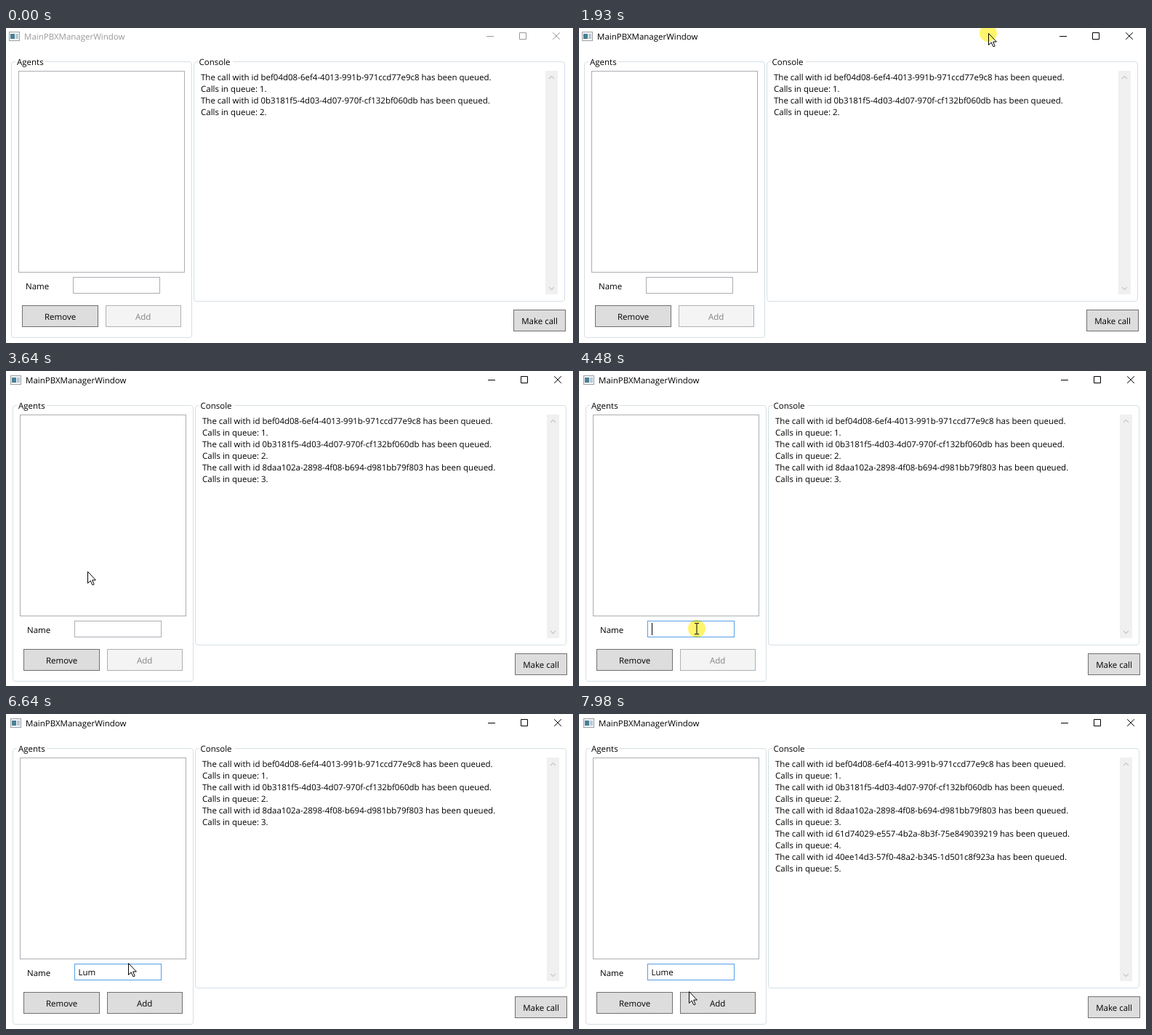
An HTML page for the animation above (8000 ms loop, 780 px wide and 434 px high).

```html
<!DOCTYPE html>
<html lang="en">
<head>
<meta charset="utf-8">
<title>Call manager</title>
<style>
  html, body { margin: 0; width: 100%; height: 100%; overflow: hidden; background: #fff; }
  svg { display: block; width: 780px; height: 434px; }
  text { font: 11.5px "Open Sans", "Noto Sans", sans-serif; text-rendering: geometricPrecision; white-space: pre; }
  .group { fill: none; stroke: #d5dfe5; }
  .field { fill: #fff; stroke: #abadb3; }
  .button { fill: #ddd; stroke: #707070; }
  .mid { text-anchor: middle; }
  .chrome { --ink: #999; }
  .chrome.active { --ink: #000; }
  .chrome text { fill: var(--ink); }
  .chrome path { fill: none; stroke: var(--ink); }
  .add.off rect { fill: #f4f4f4; stroke: #adb2b5; }
  .add.off text { fill: #838383; }
  .add.hover rect { fill: #bee6fd; stroke: #3c7fb1; }
  .arrows { fill: none; stroke: #cacaca; stroke-width: 1.3; }
  .pointer { fill: #fff; stroke: #000; }
  #halo { fill: #fff56c; mix-blend-mode: multiply; }
</style>
</head>
<body>
<svg viewBox="0 0 780 434">
  <rect width="780" height="434" fill="#fff"/>
  <g id="win">
    <rect x="4.5" y="5.5" width="14" height="12" fill="#f4f6f7" stroke="#9aa0a4"/>
    <rect x="6" y="8" width="6" height="7" fill="#4b7f96"/>
    <rect x="13" y="8" width="4" height="7" fill="#b9cad2"/>
    <g id="chrome" class="chrome">
      <text x="25" y="16">MainPBXManagerWindow</text>
      <path d="M661 11.5h10M706.5 6.5h9v9h-9zM752.2 6.2l9.6 9.6M761.8 6.2l-9.6 9.6"/>
    </g>

    <rect class="group" x="7.5" y="46.5" width="248" height="380" rx="3.5"/>
    <rect class="group" x="258.5" y="46.5" width="510" height="330" rx="3.5"/>
    <path d="M13 44h41v5h-41zM264 44h48v5h-48z" fill="#fff"/>
    <text x="15" y="51">Agents</text>
    <text x="265.5" y="51">Console</text>

    <rect class="field" x="17.5" y="59.5" width="228" height="277"/>
    <text x="27" y="360">Name</text>
    <rect id="box" class="field" x="92.5" y="343.5" width="119" height="22"/>
    <text id="entry" x="97.5" y="359"></text>
    <rect id="caret" y="346" width="1" height="17"/>

    <rect class="button" x="22.5" y="382.5" width="104" height="29"/>
    <text class="mid" x="74.5" y="402">Remove</text>
    <g id="add" class="add">
      <rect class="button" x="137.5" y="382.5" width="103" height="29"/>
      <text class="mid" x="188.7" y="402">Add</text>
    </g>
    <rect class="button" x="698.5" y="388.5" width="71" height="29"/>
    <text class="mid" x="734" y="408">Make call</text>

    <rect x="742" y="59" width="17" height="308" fill="#f0f0f0"/>
    <path class="arrows" d="M747 70l3.5-3.5 3.5 3.5M747 357l3.5 3.5 3.5-3.5"/>
    <g id="log"></g>
  </g>
  <g id="mouse">
    <path id="arrow" class="pointer" d="M.5 .5V16.4L4.2 12.9 6.8 18.5H8.7L9 17.6 6.7 12H11.4z"/>
    <path id="resize" class="pointer" d="M0-11l4 4.5h-2.5v13h2.5l-4 4.5-4-4.5h2.5v-13h-2.5z"/>
    <path id="beam" d="M-3-7.5h2.5l.5.5.5-.5h2.5M0-7v14M-3 7.5h2.5l.5-.5.5.5h2.5" fill="none" stroke="#000"/>
    <circle id="halo" r="12"/>
  </g>
</svg>
<script>
const LOOP = 8000;
const $ = id => document.getElementById(id);
const show = (id, on) => $(id).style.display = on ? '' : 'none';
const within = (t, a, b) => t >= a && t < b;
const last = (rows, t) => rows.filter(r => r[0] <= t).pop();

// Each call: time it is printed, call id
const calls = [
  [0, 'bef04d08-6ef4-4013-991b-971ccd77e9c8'],
  [0, '0b3181f5-4d03-4d07-970f-cf132bf060db'],
  [3330, '8daa102a-2898-4f08-b694-d981bb79f803'],
  [6960, '61d74029-e557-4b2a-8b3f-75e849039219'],
  [7980, '40ee14d3-57f0-48a2-b345-1d501c8f923a'],
];

// Typed text: time, value, caret position
const typing = [
  [0, '', 98], [5870, 'L', 104], [5950, 'Lu', 111], [6030, 'Lum', 120], [7980, 'Lume', 127],
];
const caretOn = [[4480, 5020], [5570, 6640], [7120, 7660]];

// Pointer keys: time, x, y, shape
const keys = [];
const at = (time, x, y, shape = 'arrow') => keys.push([time, x, y, shape]);
const easeOut = u => 1 - (1 - u) ** 1.7;
const smooth = u => u * u * (3 - 2 * u);

function sweep(t0, t1, n, [x0, y0], [x1, y1], ease) {
  for (let i = 0; i < n; i++) {
    const k = ease((i + 1) / n);
    at(t0 + (t1 - t0) * i / (n - 1), Math.round(x0 + (x1 - x0) * k), Math.round(y0 + (y1 - y0) * k));
  }
}

sweep(380, 840, 7, [759, 546], [556, 8], easeOut);
at(910, 560.5, 2, 'resize');
at(1160, 561, 2, 'resize');
at(1230, 562, 4, 'resize');
at(1630, 562, 6, 'resize');
at(1860, 564, 7);
at(1930, 563, 7);
at(2480, 564, 8);
sweep(3020, 3640, 9, [564, 8], [112, 276], smooth);
at(3710, 102, 284);
at(3790, 110, 240);
sweep(3870, 4100, 4, [118, 130], [150, 335], u => u);
at(4170, 154, 354, 'beam');
at(4250, 158, 370);
at(4400, 160, 360, 'beam');
at(4480, 162, 355, 'beam');
at(4710, 166, 349, 'beam');
at(4790, 168, 343);
sweep(6960, 7280, 5, [168, 343], [150, 386], smooth);
at(7660, 151, 382);

calls.forEach(([time, id], i) => {
  [`The call with id ${id} has been queued.`, `Calls in queue: ${i + 1}.`].forEach((line, j) => {
    const el = document.createElementNS('http://www.w3.org/2000/svg', 'text');
    el.setAttribute('x', 268);
    el.setAttribute('y', 72 + 16 * (2 * i + j));
    el.textContent = line;
    el.dataset.from = time;
    $('log').append(el);
  });
});

function render(t) {
  $('win').setAttribute('transform', t < 2480 ? '' : 'translate(2 1)');
  $('chrome').classList.toggle('active', t >= 1080);
  for (const el of $('log').children) el.style.display = t >= +el.dataset.from ? '' : 'none';

  const [, value, caretX] = last(typing, t);
  $('entry').textContent = value;
  $('caret').setAttribute('x', caretX);
  show('caret', caretOn.some(([a, b]) => within(t, a, b)));

  const hot = within(t, 4170, 4250) || within(t, 4400, 4480);
  $('box').style.stroke = t >= 4480 ? '#569de5' : hot ? '#7eb4ea' : '';
  $('add').classList.toggle('off', t < 5950);
  $('add').classList.toggle('hover', within(t, 7280, 7660));

  const key = last(keys, t);
  show('mouse', key);
  if (!key) return;
  const [, x, y, shape] = key;
  $('mouse').setAttribute('transform', `translate(${x} ${y})`);
  for (const s of ['arrow', 'resize', 'beam']) show(s, s === shape);
  show('halo', within(t, 1080, 2790) || within(t, 4480, 4630));
}

const start = performance.now();
function tick() {
  render((performance.now() - start) % LOOP);
  requestAnimationFrame(tick);
}
tick();
</script>
</body>
</html>
```
